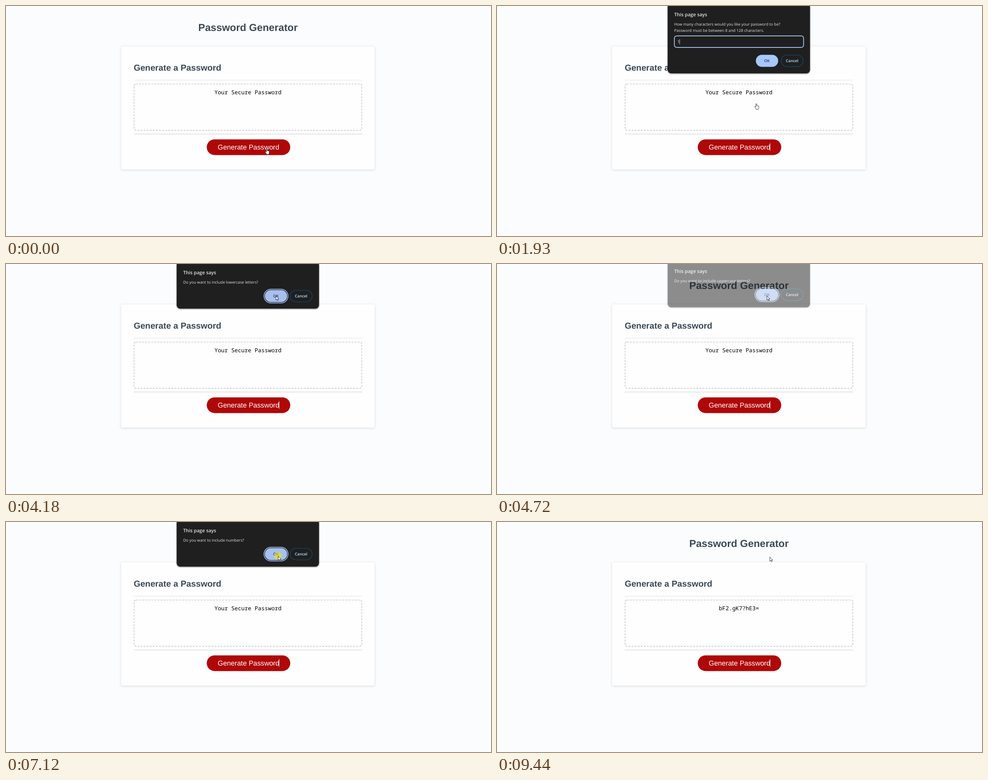
Write an HTML page that moves like this. It is 1086 px wide and 516 px high and loops after 9500 ms.

```html
<!DOCTYPE html>
<html lang="en">
<head>
<meta charset="utf-8">
<title>Password Generator</title>
<style>
  html, body { margin: 0; width: 100%; height: 100%; overflow: hidden; background: #fbfcfe; }
  svg { display: block; width: 100%; height: 100%; }
  text { text-rendering: geometricPrecision; white-space: pre; }
  .head { font-family: "Liberation Sans", Arial, sans-serif; font-weight: 700; fill: #3b4954; }
  .mono { font: 12.5px "Noto Sans Mono", monospace; }
  .ui { font: 8.72px "Open Sans", "Noto Sans", sans-serif; fill: #e3e3e3; }
  .bold { font-weight: 600; }
  .mid { text-anchor: middle; }
  .card { filter: drop-shadow(0 1.4px 2.8px rgba(0, 0, 0, .15)); }
  .panel { filter: drop-shadow(0 1px 1.5px rgba(0, 0, 0, .6)); }
</style>
</head>
<body>
<svg viewBox="0 0 1086 516">
  <rect width="1086" height="516" fill="#fbfcfe"/>
  <text class="head mid" x="541.8" y="55.5" font-size="22.75">Password Generator</text>
  <rect class="card" x="257.6" y="90.5" width="568" height="276.5" rx="3.5" fill="#fefefe"/>
  <text class="head" x="285.9" y="145.2" font-size="19.3">Generate a Password</text>
  <path d="M286 166.4H797.4" stroke="#e2e3e6"/>
  <path d="M286 287.2H797.4" stroke="#dcdde1" stroke-width="1.4"/>
  <rect x="286.7" y="175.1" width="510" height="103.6" rx="4" fill="none"
        stroke="#c2c3cd" stroke-width="1.4" stroke-dasharray="4.3 2.6"/>
  <text class="mono mid" id="output" x="541.7" y="198.2"></text>
  <rect x="449.5" y="299.2" width="187" height="35.2" rx="17.6" fill="#af0808"/>
  <text class="mid" x="543" y="322.2" font-size="15.62" fill="#fff"
        font-family="'Liberation Sans', Arial, sans-serif">Generate Password</text>
  <path id="pageCaret" d="M611.5 307.5V325" stroke="#f0d4d4"/>

  <g id="dialog">
    <rect class="panel" id="panel" x="382.2" y="-6" width="318.6" rx="8" fill="#1f1f1f"/>
    <text class="ui bold" x="396.7" y="23.2" style="font-size:10.7px">This page says</text>
    <text class="ui" id="line1" x="396.7" y="43.6"></text>
    <g id="prompt">
      <text class="ui" x="396.7" y="57.9">Password must be between 8 and 128 characters.</text>
      <rect id="field" x="397.2" y="67.2" width="289.3" height="25.6" rx="5" fill="#1f1f1f"/>
      <text class="ui" id="typed" x="404" y="83"></text>
      <path id="fieldCaret" d="M.5 74.5V86" stroke="#e3e3e3" stroke-width=".9"/>
    </g>
    <g id="buttons">
      <rect id="ring" x="577.6" y="-15.5" width="54" height="31" rx="15.5" fill="none"
            stroke="#a8c7fa" stroke-width="1.5"/>
      <rect id="ok" x="579.6" y="-13.4" width="50" height="26.8" rx="13.4"/>
      <text class="ui bold mid" x="604.4" y="3.3" style="fill:#1a3a75">OK</text>
      <rect x="636.2" y="-13" width="49.4" height="26" rx="13" fill="none" stroke="#0d5380" stroke-width="1.1"/>
      <text class="ui bold mid" x="660.8" y="3.3" style="fill:#c2e7ff">Cancel</text>
    </g>
  </g>

  <circle id="spot" r="8.5" fill="#f0e800" opacity=".6"/>
  <g id="cursor" stroke="#111" stroke-width=".8" stroke-linejoin="round" fill="#fff">
    <path id="hand" d="M-1 8V1.2C-1 0 1 0 1 1.2V5C1 4.2 2.6 4.3 2.6 5.2 2.7 4.6 4.1 4.7 4.1 5.6 4.2 5.1 5.5 5.2 5.5 6.2V9C5.5 11 4.5 11.5 4.5 13H-.2C-.4 11.5-3 9.6-3.6 7.6-3.9 6.6-2.6 6.2-2 7Z"/>
    <path id="arrow" d="M.4 .5V10L2.6 8 4 11.3 5.6 10.6 4.2 7.4H6.8Z"/>
  </g>
</svg>
<script>
const LOOP = 9500;
const $ = Object.fromEntries([...document.querySelectorAll("[id]")].map(e => [e.id, e]));

const messages = [
  "How many characters would you like your password to be?",
  "Do you want to include lowercase letters?",
  "Do you want to include uppercase letters?",
  "Do you want to include numbers?",
  "Do you want to include special characters?"
];

// Each click closes one dialog and opens the next: start, end, steps.
const clicks = [
  [130, 470, 5], [2990, 3250, 4], [4510, 4850, 5],
  [5850, 6190, 5], [7120, 7450, 5], [8260, 8570, 5]
];

// Dialog look per step of a change: offset to next dialog, opacity, shift.
const phases = [[0, 1, 0], [0, 1, -.6], [0, .35, -4], [1, .5, -3], [1, .88, -1], [1, 1, 0]];

// Pointer tip: time, x, y.
const path = [
  [0, 584, 320], [130, 584, 320], [200, 582, 321.5], [940, 582, 321.5],
  [1860, 579, 222], [2120, 588, 205], [2320, 588, 205], [2730, 602, 124.8],
  [3720, 602, 124.8], [4180, 604, 71], [5309, 604, 71], [5310, 604, 72],
  [6519, 604, 72], [6585, 609, 76], [7999, 609, 76], [8000, 610.5, 78], [LOOP, 610.5, 78]
];

const within = (t, a, b) => t >= a && t < b;
const show = (el, on) => el.setAttribute("visibility", on ? "inherit" : "hidden");
const put = (el, x, y) => el.setAttribute("transform", `translate(${x} ${y})`);
const attrs = (el, o) => { for (const k in o) el.setAttribute(k, o[k]); };
const label = (el, s) => { if (el.textContent !== s) el.textContent = s; };

function pointer(t) {
  const i = path.findIndex(p => p[0] > t);
  const [t0, x0, y0] = path[i - 1], [t1, x1, y1] = path[i];
  const p = (t - t0) / (t1 - t0), e = p * p * (3 - 2 * p);
  return [x0 + (x1 - x0) * e, y0 + (y1 - y0) * e];
}

function dialogState(t) {
  const n = clicks.findLastIndex(c => t >= c[0]);
  if (n < 0) return { index: -1, opacity: 0, shift: 0, clicked: false };
  const [start, end, steps] = clicks[n];
  let k = Math.min(steps, Math.floor((t - start) / (end - start) * steps));
  const clicked = k === 0;
  if (steps === 4 && k > 1) k++;
  const [next, opacity, shift] = phases[k];
  return { index: n - 1 + next, opacity, shift, clicked };
}

function drawDialog(t, { index, opacity, shift }) {
  const open = index >= 0 && index < messages.length;
  show($.dialog, open);
  if (!open) return;
  const first = index === 0, focused = t < 2990;
  $.dialog.setAttribute("opacity", opacity);
  put($.dialog, 0, shift);
  $.panel.setAttribute("height", first ? 157 : 106);
  label($.line1, messages[index]);
  show($.prompt, first);
  put($.buttons, 0, first ? 123 : 72);
  show($.ring, !first);
  $.ok.setAttribute("fill", first ? "#a8c7fa" : "#a7c0ed");
  if (!first) return;
  attrs($.field, focused
    ? { stroke: "#a8c7fa", "stroke-width": 1.7 }
    : { stroke: "#757775", "stroke-width": .9 });
  const typed = t < 1930 ? "" : t < 2120 ? "1" : "12";
  label($.typed, typed);
  put($.fieldCaret, 403.5 + typed.length * 4.99, 0);
  show($.fieldCaret, t < 800 || within(t, 1330, 1860) || within(t, 1930, 2650));
}

function draw(t) {
  const state = dialogState(t), [x, y] = pointer(t);
  label($.output, t < 8440 ? "Your Secure Password" : "bF2.gK7?hE3=");
  show($.pageCaret, within(t, 200, 8910) || t >= 9440);
  drawDialog(t, state);
  show($.spot, state.clicked);
  put($.spot, x, y);
  put($.cursor, x, y);
  show($.hand, t < 3720);
  show($.arrow, t >= 3720);
}

const began = performance.now();
function tick() {
  draw((performance.now() - began) % LOOP);
  requestAnimationFrame(tick);
}
tick();
</script>
</body>
</html>
```
